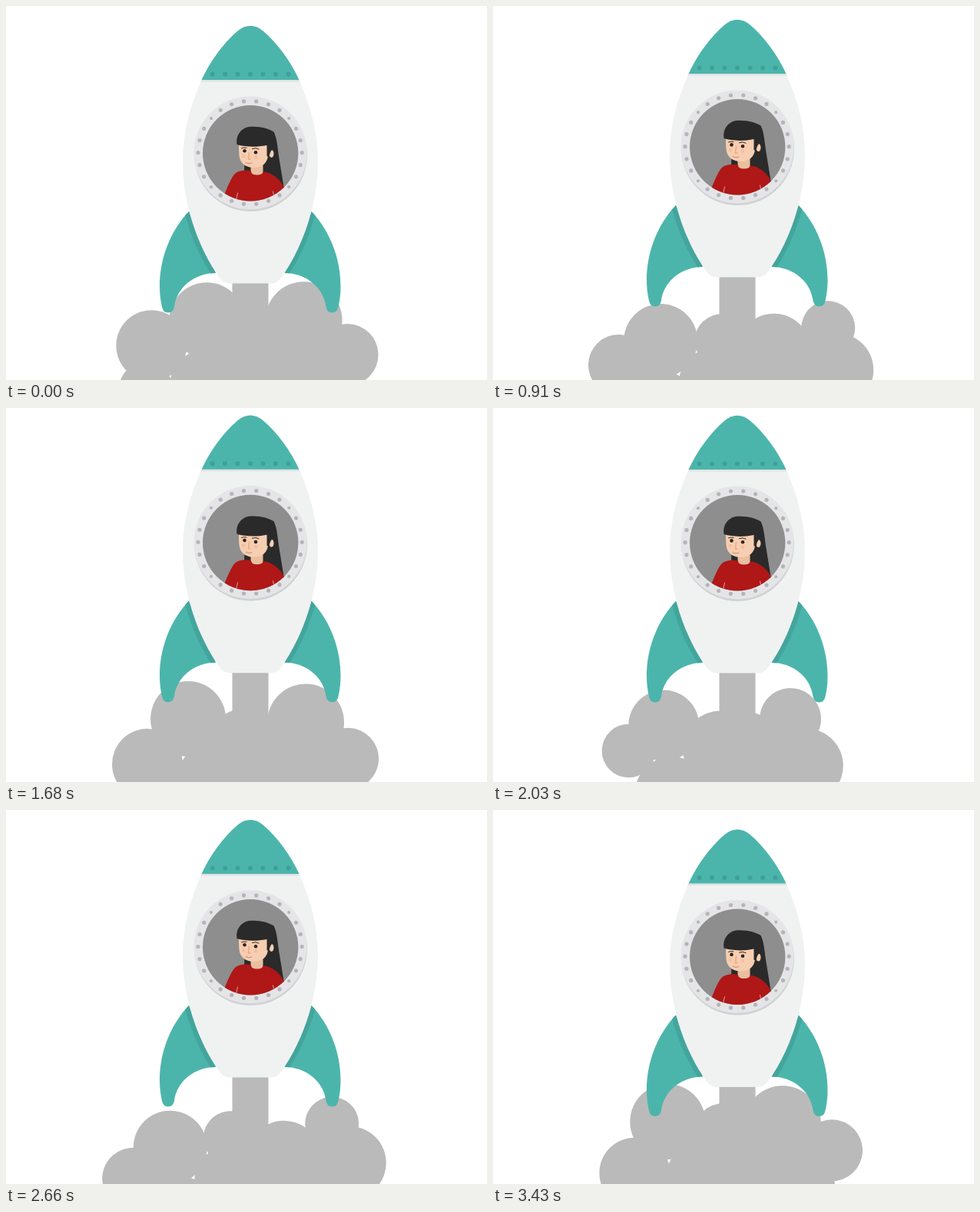
An HTML page that plays this animation: 626 by 486 pixels, repeating every 3.5 s.

```html
<!DOCTYPE html>
<html lang="en">
<head>
<meta charset="utf-8">
<title>Rocket launch</title>
<style>
  html, body { margin: 0; width: 100%; height: 100%; overflow: hidden; background: #fff; }
  svg { display: block; width: 626px; height: 486px; }
  .smoke { fill: #bababa; }
  .teal { fill: #4cb5ab; }
  .dark { fill: #3fa098; }
  .hair { fill: #2a2a2a; }
  .skin { fill: #f6ceb1; }
  .line { fill: none; stroke-linecap: round; }
</style>
</head>
<body>
<svg viewBox="0 0 626 486">
  <defs>
    <path id="hull" d="M254.5 96C238 133 230 167 230 202C230 255 248 308 273 346Q281 360.5 290 360.5H346Q355 360.5 363 346C388 308 406 255 406 202C406 167 398 133 381.5 96Z"/>
    <path id="finShape" d="M238 267C214 292 200 328 200 364C200 374 201 382 203 391Q204.5 398.5 211 398.5Q217.500 398.5 219 391C222 366 245 347 273 347Z"/>
    <clipPath id="finClip"><use href="#finShape"/></clipPath>
    <clipPath id="glass"><circle cx="318.2" cy="191.200" r="62.2"/></clipPath>
    <g id="fin">
      <use href="#finShape" class="teal"/>
      <use href="#hull" clip-path="url(#finClip)" fill="none" stroke="#43a59c" stroke-width="13"/>
    </g>
  </defs>

  <g class="smoke" id="left"></g>
  <g class="smoke" id="right"></g>

  <g id="rocket">
    <rect class="smoke" x="294.5" y="350" width="47" height="170"/>
    <use href="#fin"/>
    <use href="#fin" transform="translate(635.5) scale(-1 1)"/>
    <use href="#hull" fill="#f0f2f2"/>
    <path fill="#e0e3e3" d="M254.5 96H381.5L382.500 98.500H253.500Z"/>
    <path class="teal" d="M254.5 96C266 71 283 48 302 32Q318 19.5 334 32C353 48 370 71 381.5 96Z"/>
    <g class="dark" id="rivets"></g>

    <circle cx="318.5" cy="193.5" r="73.5" fill="#d0d2d3"/>
    <circle cx="318" cy="190.8" r="73.5" fill="#e5e5e7"/>
    <g fill="#b5b5b9" id="bolts"></g>
    <circle cx="318.2" cy="191.2" r="62.2" fill="#8e8e8e"/>

    <g clip-path="url(#glass)">
      <path class="hair" d="M311 180L310 218L340 224L362 238L355 195C353 180 352 168 348 164L320 170Z"/>
      <path fill="#eabf9f" d="M318.500 200H334.500V220H318.500Z"/>
      <path fill="#b01717" d="M282 250C289 234 293 222 299 217C306 213 313 213 319 214.500Q319 219.500 326.500 219.500Q334 219.500 334.500 215.500C347 216 358 226 363 238L360 262H282Z"/>
      <path class="line" stroke="#d9a3a0" d="M301.500 243L299.500 252M347.500 241L349 248"/>
      <path class="skin" d="M303 178C303 186 303 194 304.500 199C307 206 314 210 322 210C333 210 341 204 341 193L342 176Z"/>
      <ellipse class="skin" cx="345.500" cy="192" rx="3" ry="5"/>
      <path class="hair" d="M300.500 180C298.500 169 305 159 316 157C328 155.500 343 159 349 164L352 186L347.500 187C344 186 343.500 194 341.500 196L339.500 195L339.500 181C325 184 310 183 300.500 180Z"/>
      <g class="line" stroke="#33251f">
        <path d="M306.500 184.800Q309 183.300 313 184.300M320.500 185.500Q325 183.800 329 186"/>
      </g>
      <circle cx="310.500" cy="188.300" r="2.300" fill="#33251f"/>
      <circle cx="325" cy="190.200" r="2.300" fill="#33251f"/>
      <circle cx="309" cy="195" r="2.400" fill="#f7bda2"/>
      <circle cx="325" cy="196.500" r="2.400" fill="#f7bda2"/>
      <path class="line" stroke="#efa97f" stroke-width="1.500" d="M316.500 190.500L315.500 199H318"/>
      <path class="line" stroke="#d98070" d="M312 203.500Q316 206.500 320 204"/>
    </g>
  </g>
</svg>

<script>
const LOOP = 3500, STEP = 70;
const $ = id => document.getElementById(id);

function dot(parent, x, y, r) {
  const c = document.createElementNS("http://www.w3.org/2000/svg", "circle");
  c.setAttribute("cx", x.toFixed(2));
  c.setAttribute("cy", y.toFixed(2));
  c.setAttribute("r", r);
  parent.append(c);
}

// Each cloud spins about its centre; lobes are [angle, distance, radius].
const clouds = [
  { el: $("left"), x: 239, y: 465, turn: 14.03,
    lobes: [[3.5, 75.5, 39.5], [68.5, 61, 49], [154.5, 55, 46], [209.5, 65.5, 34.8], [307, 36.5, 48]] },
  { el: $("right"), x: 382, y: 468, turn: -14.9,
    lobes: [[13.4, 64.3, 40], [84.7, 60, 50], [162, 65.7, 47.7], [208.8, 73.5, 35], [295, 26, 48]] }
];

for (const { el, x, y, lobes } of clouds) {
  for (const [deg, dist, r] of lobes) {
    const a = deg * Math.PI / 180;
    dot(el, x + dist * Math.cos(a), y - dist * Math.sin(a), r);
  }
}

for (let i = 0; i < 7; i++) dot($("rivets"), 268.5 + i * 16.5, 88.5, 3);

for (let i = 0; i < 26; i++) {
  const a = i * Math.PI / 13;
  const small = i % 13 === 3 || i % 13 === 10;
  dot($("bolts"), 317.6 + 67.6 * Math.cos(a), 190.6 + 67.2 * Math.sin(a), small ? 2.1 : 2.6);
}

// Rocket height: [ms, px]
const lift = [
  [0, 0], [350, -13.6], [580, -18.3], [910, -7.9], [1060, -6.8], [1330, -11.2], [1700, -16.3],
  [2030, -15.9], [2240, -13.1], [2450, -12.5], [2660, -13], [2800, -11.4], [3360, -4.6], [3430, -0.4], [3500, 0]
];
const slope = i => (lift[i + 1][1] - lift[i][1]) / (lift[i + 1][0] - lift[i][0]);

function tangent(i) {
  if (i === 0) return slope(0);
  if (i === lift.length - 1) return slope(i - 1);
  const a = slope(i - 1), b = slope(i);
  return a * b <= 0 ? 0 : 2 * a * b / (a + b);
}

function height(t) {
  let i = 0;
  while (i < lift.length - 2 && t >= lift[i + 1][0]) i++;
  const [t0, y0] = lift[i], [t1, y1] = lift[i + 1];
  const d = t1 - t0, u = (t - t0) / d, v = 1 - u;
  return v * v * (1 + 2 * u) * y0 + u * u * (3 - 2 * u) * y1
    + d * u * v * (v * tangent(i) - u * tangent(i + 1));
}

function draw(ms) {
  const n = Math.floor((ms % LOOP) / STEP);
  $("rocket").setAttribute("transform", `translate(0 ${height(n * STEP).toFixed(2)})`);
  for (const { el, x, y, turn } of clouds) {
    el.setAttribute("transform", `rotate(${(turn * n).toFixed(2)} ${x} ${y})`);
  }
}

const start = performance.now();
function tick() {
  draw(performance.now() - start);
  requestAnimationFrame(tick);
}
draw(0);
requestAnimationFrame(tick);
</script>
</body>
</html>
```
